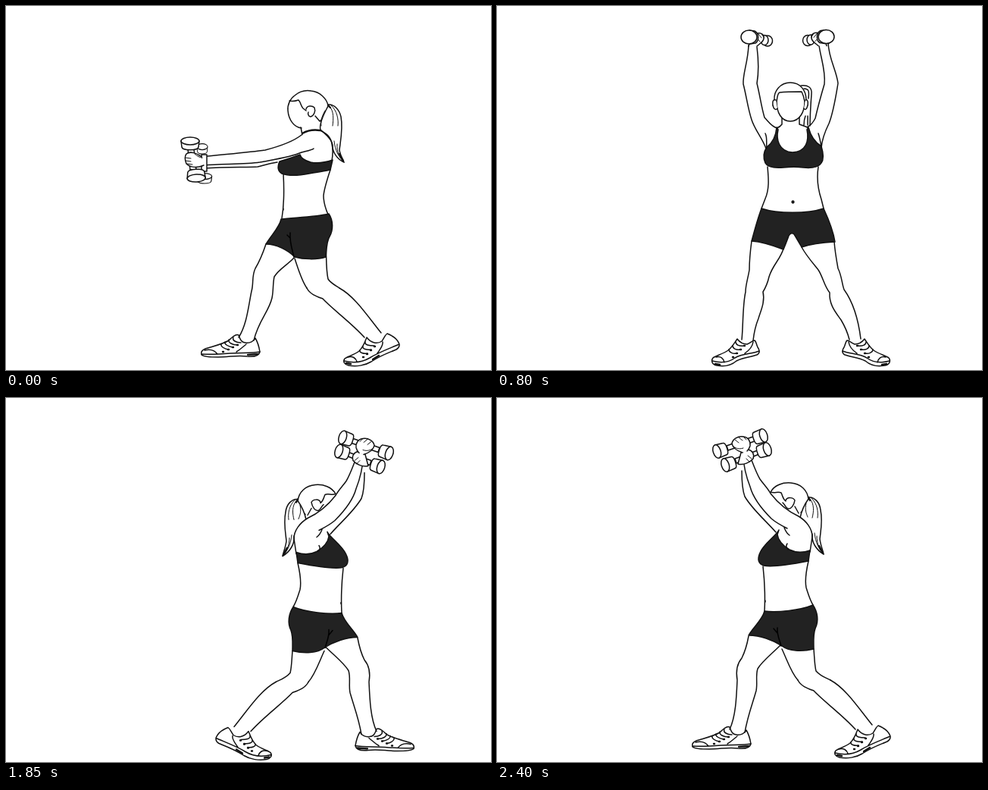
An HTML page that plays this animation: 640x480 px, repeating every 2.7 s.

```html
<!DOCTYPE html>
<html lang="en">
<head>
<meta charset="utf-8">
<title>Dumbbell twist</title>
<style>
  html, body { margin: 0; width: 100%; height: 100%; overflow: hidden; background: #fff; }
  svg { display: block; width: 640px; height: 480px; }
  #stage { fill: none; stroke: #111; stroke-width: 1.5; stroke-linecap: round; stroke-linejoin: round; }
  .dark { fill: #222; }
  .skin { fill: #fff; }
  .thin { stroke-width: 1; }
  .bold { stroke-width: 2.4; }
  .pose { visibility: hidden; }
</style>
</head>
<body>
<svg viewBox="0 0 640 480">
<defs>
  <g id="disc" class="skin">
    <path d="M-12-3L-11 5C-10 10 10 10 11 5L12-3"/>
    <ellipse cy="-3" rx="12" ry="5"/>
  </g>
  <g id="drum" class="skin">
    <path d="M-5-9L6-8C10-8 10 8 6 8L-5 9"/>
    <ellipse cx="-5" rx="5" ry="9"/>
  </g>

  <g id="stance">
    <!-- front shoe -->
    <path class="skin" d="M307 434C303 432 298 437 294 441C286 446 272 449 263 452C258 454 257 457 258 460C262 463 270 463 280 463C295 463 305 460 318 462C328 463 334 461 335 456C334 450 332 443 329 438C327 442 322 445 316 444C311 444 309 440 307 434Z"/>
    <path d="M258 459C270 460 284 459 296 458C310 457 325 458 335 456M262 454C270 452 276 455 279 459M289 443C288 446 293 449 299 450M294 440C293 444 299 447 305 447M300 437C298 441 304 444 310 444M284 446C283 449 288 452 293 453M317 446C313 449 309 453 304 456"/>
    <path class="bold" d="M319 460L332 459M299 450h1M305 447h1M293 453h1M286 456h1"/>
    <!-- rear shoe -->
    <path class="skin" d="M476 437C474 442 472 449 466 455C460 460 451 462 447 465C444 469 447 473 452 474C462 476 474 474 482 469C492 462 505 457 515 453C520 450 520 446 517 442C514 437 508 434 503 432C500 434 499 438 496 442C490 446 482 445 476 437Z"/>
    <path d="M446 468C458 471 470 470 480 464C491 457 505 452 519 446M451 463C458 461 462 465 463 469M474 443C473 447 479 448 486 448M471 449C470 452 476 454 482 453M467 454C466 457 472 459 477 458M497 443C498 448 494 452 490 458"/>
    <path class="bold" d="M484 466L492 461M486 449h1M481 454h1M476 459h1M471 463h1M449 471L455 472"/>
    <!-- rear calf -->
    <path d="M397 372C401 380 410 383 418 386C431 400 456 418 473 437M440 372C460 383 475 406 495 431"/>
  </g>

  <g id="reach">
    <use href="#stance"/>
    <path d="M343 314C339 326 335 336 329 346C324 356 327 366 324 376C320 395 318 420 307 437M380 332C372 341 360 347 354 357C352 366 353 376 351 385C347 403 333 415 327 441"/>
    <path d="M381 333C386 348 390 362 397 372M422 313C423 330 422 347 425 360C428 365 434 368 440 372"/>
    <path d="M428 216C424 228 420 240 419 250C419 260 422 268 425 275M366 222C367 240 367 262 364 280M366 267v2"/>
    <path class="dark" d="M363 281C380 279 410 278 426 274C432 283 432 296 427 304C423 310 423 322 422 331C410 335 392 334 381 331C372 322 357 314 343 314C350 302 361 292 363 281Z"/>
    <path stroke="#000" d="M375 299C374 312 378 322 380 331M371 302L375 306"/>
    <!-- head -->
    <path d="M390 161C380 160 373 150 372 138C371 131 375 122 381 118C388 112 397 111 403 112C414 113 423 122 425 131C424 140 421 148 414 152M374 125C378 126 383 125 386 124C389 127 389 132 392 135L396 138M396 136C397 131 404 131 407 134C409 139 406 145 402 146C399 146 398 142 399 140M408 145L414 152M389 160L391 170"/>
    <path class="skin" d="M425 130C433 129 440 137 442 146C445 162 441 180 440 190C441 196 444 202 446 206C437 202 430 192 431 183C430 175 420 168 415 163C413 157 418 145 425 132"/>
    <path class="thin" d="M427 133C433 138 432 150 431 158M429 131C437 138 439 150 438 158M421 138C416 147 415 152 416 158M433 178C434 190 439 199 446 206M437 182C436 192 441 201 446 206"/>
    <path class="bold" d="M425 131L428 134M440 195L445 204"/>
    <!-- top and arms -->
    <path class="dark" d="M361 205C358 212 359 218 364 221C372 224 385 224 400 221C412 219 424 217 428 216L431 203C422 206 411 208 402 206C395 204 389 200 388 196C380 199 368 203 361 205Z"/>
    <path class="bold" d="M391 168C398 164 407 163 414 164"/>
    <path d="M414 164C424 168 429 173 430 182C432 190 431 198 430 204M262 214C290 212 320 213 332 212C337 211 345 208 358 206"/>
    <path class="skin" d="M390 170C380 178 365 184 342 190C320 193 285 196 258 199L261 210C290 208 315 209 335 206C350 203 374 200 390 193C398 191 404 190 406 188" />
    <path stroke="#fff" stroke-width="2" d="M392 171L404 187"/>
    <!-- dumbbells -->
    <g transform="translate(259 188) scale(.58 .8)"><use href="#disc"/></g>
    <g transform="translate(262 227) scale(.8)"><use href="#disc"/></g>
    <path class="skin" d="M258 196v22h7v-22zM240 189L243 216H251L248 189Z"/>
    <use href="#disc" transform="translate(243 181)"/>
    <use href="#disc" transform="translate(251 224) rotate(177)"/>
    <path class="skin" d="M258 199C252 194 243 191 238 195C235 199 236 203 238 208C243 213 252 214 261 210"/>
    <path class="thin" d="M237 200L244 201M237 204L244 205M239 208L246 209M249 195C253 198 255 200 259 200"/>
  </g>

  <g id="lift">
    <use href="#stance"/>
    <path d="M332 314C330 325 327 335 323 343C317 350 315 360 317 372C316 395 315 420 307 437M374 326C362 338 350 347 344 357C341 366 344 376 342 386C337 404 331 418 327 441"/>
    <path d="M376 331C383 346 388 362 397 372M418 331C419 343 419 352 421 360C427 367 434 369 440 372"/>
    <path d="M411 215C408 228 406 240 408 250C411 260 414 268 417 273M351 222C353 240 354 262 353 281M354 267v2"/>
    <path class="dark" d="M353 281C370 283 400 280 417 273C423 282 425 294 420 304C417 312 418 322 418 331C402 335 385 334 376 327C364 319 347 313 332 313C338 302 350 293 353 281Z"/>
    <path stroke="#000" d="M370 303C369 311 373 320 375 327M365 304L370 310"/>
    <!-- head -->
    <path d="M361 124C366 115 377 111 388 112C400 113 410 121 411 134C410 141 406 147 401 151M361 124C366 126 371 123 375 125C377 129 377 133 381 136M381 135C383 130 391 131 393 135C392 141 388 147 384 146C381 145 381 142 377 138M393 143L398 152"/>
    <path class="skin" d="M411 131C419 130 426 138 427 148C430 162 427 176 426 186C427 194 430 201 431 206C421 200 415 190 416 180C414 172 405 162 400 158C402 148 406 140 411 133"/>
    <path class="thin" d="M413 133C419 140 418 150 416 158M415 132C423 140 424 150 423 158M408 139C406 147 408 152 410 157M419 178C420 190 425 200 431 206M422 182C422 192 426 201 431 206"/>
    <path class="bold" d="M411 131L413 135M425 195L430 204"/>
    <!-- top and arms -->
    <path class="dark" d="M372 174C368 182 352 192 347 204C343 213 345 219 352 221C362 223 380 221 411 215L413 201C404 204 394 204 386 200C378 195 371 188 370 180Z"/>
    <path d="M323 96C323 110 324 122 327 130C337 147 353 160 368 177"/>
    <path class="skin" stroke="none" d="M327 72C328 92 330 106 334 117C340 134 352 150 364 160L384 171L416 180C414 168 406 160 398 156C384 150 370 138 361 126C346 110 338 88 330 68Z"/>
    <path d="M330 68C336 80 340 95 347 107C352 114 358 120 361 126C372 140 385 150 398 156C408 162 416 172 416 183L413 203M324 72C325 85 328 102 334 117C338 132 350 147 362 159C369 165 377 169 383 172M379 171C381 176 383 179 386 181M383 192C381 195 382 198 384 200"/>
    <!-- dumbbells -->
    <path class="skin" d="M314 80L344 69L346 74L316 86ZM303 63L338 51L340 57L305 69Z"/>
    <use href="#drum" transform="translate(306 87) rotate(-18)"/>
    <use href="#drum" transform="translate(352 69) rotate(162)"/>
    <path class="skin" d="M318 87C325 89 334 85 338 80C340 74 337 69 331 68L322 72Z"/>
    <path class="thin" d="M331 76L336 80M329 80L333 84"/>
    <use href="#drum" transform="translate(295 69) rotate(-18)"/>
    <use href="#drum" transform="translate(347 51) rotate(162)"/>
    <path class="skin" d="M324 72C318 70 311 66 310 60C311 54 318 50 325 51C332 52 335 58 334 63C333 67 331 69 330 70"/>
    <path class="thin" d="M314 55L319 59M319 52L324 56M325 51L329 55M312 64C317 68 322 67 325 66"/>
  </g>

  <g id="frontShoe">
    <path class="skin" d="M317 439C314 443 311 449 305 454C298 459 289 461 285 464C282 468 284 473 290 474C300 476 309 474 316 468C325 463 335 463 343 460C347 458 347 454 344 450C342 446 342 442 340 441C337 441 335 444 330 446C324 446 320 443 317 439Z"/>
    <path d="M284 468C295 471 306 470 314 464C324 458 336 459 346 455M289 463C295 461 299 465 300 470M315 443C315 447 320 449 326 448M311 448C311 452 316 454 321 453M306 453C306 457 312 459 316 458M338 443C337 450 333 454 327 458"/>
    <path class="bold" d="M326 448h1M321 453h1M316 458h1M311 463h1M288 472L294 473"/>
  </g>
  <g id="frontBell" class="skin">
    <ellipse cx="357" cy="46" rx="6.5" ry="7"/>
    <ellipse cx="353" cy="45" rx="5" ry="6.5"/>
    <path d="M332 53C333 48 339 39 344 36C349 35 353 38 352 43C351 48 346 50 343 53"/>
    <path class="thin" d="M345 37L349 42M342 41L347 47M349 37L352 41"/>
    <path d="M333 32L340 33C346 36 346 46 341 49L334 50"/>
    <ellipse cx="332.5" cy="41" rx="10.5" ry="9"/>
  </g>
  <g id="front">
    <path d="M336 310C334 325 333 335 333 348C331 360 328 368 328 377C324 395 325 420 323 440M378 320C374 334 364 341 359 357C357 366 354 372 351 377C354 390 348 402 345 412C341 422 339 432 338 441"/>
    <path d="M445 311C446 324 448 335 450 346C455 356 455 366 458 374C471 392 477 415 480 439M402 318C408 329 416 338 424 348C430 357 432 370 439 378C438 394 447 404 454 414C460 424 463 432 465 440"/>
    <use href="#frontShoe"/>
    <use href="#frontShoe" transform="translate(802 0) scale(-1 1)"/>
    <path d="M357 212C358 225 360 240 354 254L349 267M424 212C422 225 423 240 428 255L431 267"/>
    <circle cx="390.5" cy="258.5" r="1.4" fill="#333"/>
    <path class="dark" d="M349 267C370 274 410 274 431 267C437 280 444 298 446 311C430 312 414 314 402 318C398 311 394 304 392 301C390 299 387 299 385 303C383 309 380 316 378 321C365 316 350 311 336 310C340 295 344 280 349 267Z"/>
    <path class="dark" d="M369 160L371 163C368 176 372 192 390 193C408 192 412 178 409 163L411 160C414 172 420 180 428 185C431 195 431 203 428 207C424 214 414 214 404 213C396 212 388 212 378 213C366 214 357 213 354 207C351 200 352 192 356 186C364 180 368 172 369 160Z"/>
    <!-- arms -->
    <path d="M355 188C350 174 340 163 336 150C331 135 329 118 325 103C324 90 331 75 332 52M343 54C345 70 346 85 343 102C347 118 349 134 353 147C359 153 362 159 370 161M354 168C357 174 355 180 356 187"/>
    <path d="M437 49C438 70 448 85 450 102C447 120 444 140 438 155C433 165 429 175 428 187M425 52C427 68 434 85 432 103C427 120 423 135 420 148C417 154 413 158 409 160M424 168C426 174 427 180 428 186"/>
    <!-- head -->
    <path d="M401 105C410 104 416 107 415 116C414 130 413 145 413 158M405 109C412 109 412 113 411 122M407 145C405 150 405 154 405 157M410 145L410 157M376 147V156C374 159 372 160 369 161M399 145V156L410 160"/>
    <path class="skin" d="M366 124C365 112 374 101 387 101C400 101 408 111 408 124L406 126C406 140 399 152 387 152C375 152 369 140 369 126Z"/>
    <path d="M369 126C370 120 370 115 373 114C382 113 394 113 402 113C404 117 405 120 406 126"/>
    <path class="skin" d="M368 124C363 122 363 130 365 134C366 137 369 137 370 135M407 124C411 122 411 130 409 134C408 137 406 137 405 135"/>
    <use href="#frontBell"/>
    <use href="#frontBell" transform="translate(767 -.5) scale(-1 1)"/>
  </g>
</defs>
<g id="stage">
  <use class="pose" id="reachLeft" href="#reach"/>
  <use class="pose" id="liftLeft" href="#lift"/>
  <use class="pose" id="facing" href="#front"/>
  <use class="pose" id="liftRight" href="#lift" transform="translate(796 2.5) scale(-1 1)"/>
  <use class="pose" id="reachRight" href="#reach" transform="translate(796 2.5) scale(-1 1)"/>
</g>
</svg>
<script>
  const LOOP = 2700;
  const steps = [
    [0, 'reachLeft'], [500, 'liftLeft'], [800, 'facing'], [1050, 'liftRight'],
    [1350, 'reachRight'], [1850, 'liftRight'], [2150, 'facing'], [2400, 'liftLeft']
  ];
  const poses = document.querySelectorAll('.pose');
  const start = performance.now();

  function draw() {
    const time = Math.max(0, performance.now() - start) % LOOP;
    const current = steps.filter(([at]) => at <= time).pop()[1];
    poses.forEach(pose => { pose.style.visibility = pose.id === current ? 'visible' : 'hidden'; });
    requestAnimationFrame(draw);
  }
  draw();
</script>
</body>
</html>
```
